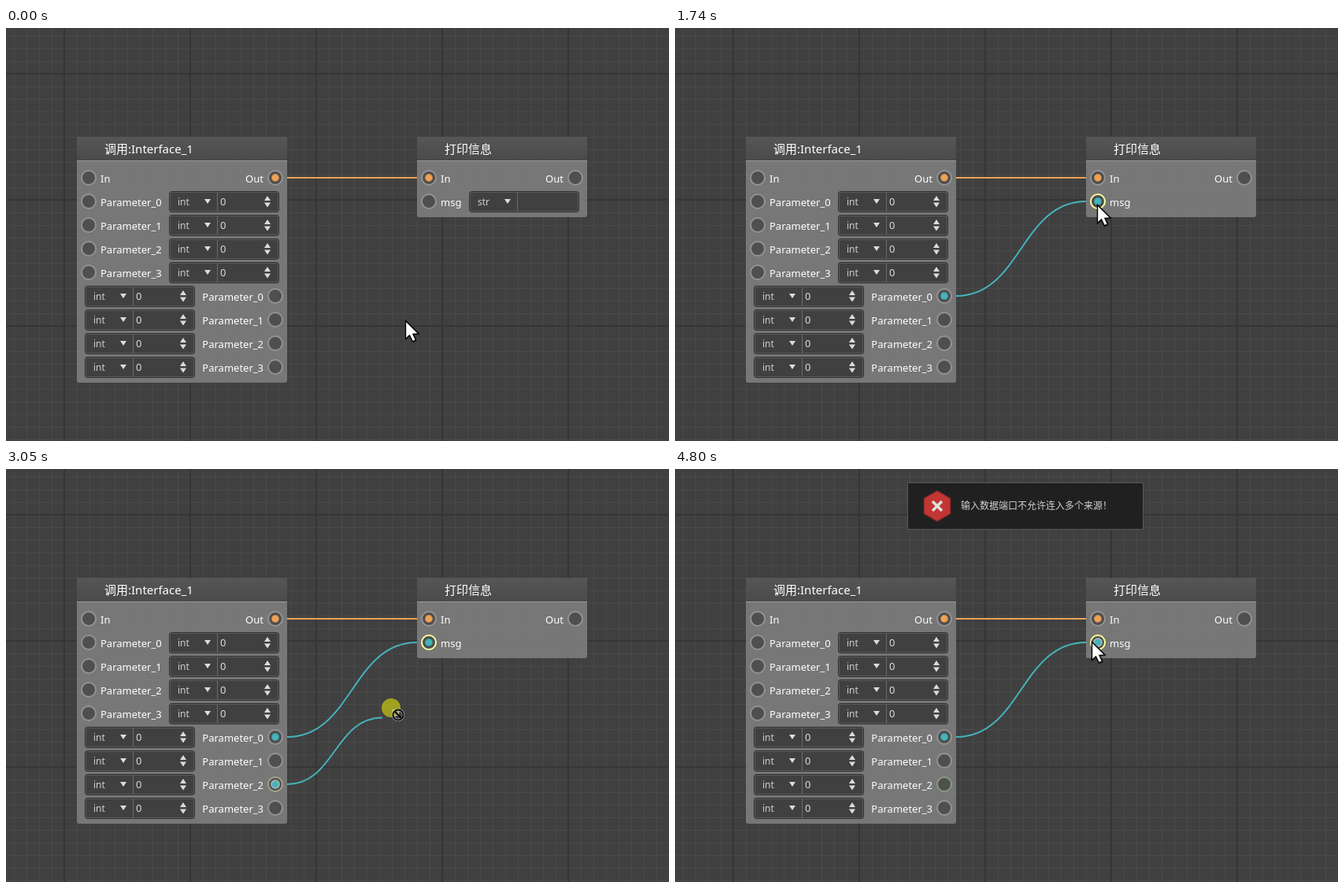
Animation of 842 by 524 pixels, one loop 5530 ms. Source, as an HTML page with a canvas:

```html
<!DOCTYPE html>
<html lang="zh-CN">
<head>
<meta charset="utf-8">
<style>
html, body { margin: 0; width: 100%; height: 100%; overflow: hidden; background: #404040; }
canvas { display: block; }
</style>
</head>
<body>
<canvas id="stage" width="842" height="524"></canvas>
<script>
const ctx = document.getElementById('stage').getContext('2d');
const W = 842, H = 524, LOOP = 5530, STEP = 70;
const FONT = '"Noto Sans", "Noto Sans CJK SC", "Noto Sans CJK", sans-serif';
const ORANGE = '#eda254', TEAL = '#45b3bb', RING = '#939393', HOT = '#ffff9c';

// Moments at which the scene changes hard
const PRESS_1 = 690, DROP_1 = 1600, PRESS_2 = 2640, DRAG_2 = 2710, DROP_2 = 3470;
const REJECT = 3540, CLEAR = 4100, TOAST = 3860;

// Pointer path: time, x, y
const PATH = [
  [0, 507, 371], [70, 498, 370], [280, 402, 360], [490, 342, 347], [560, 338, 346],
  [690, 336, 346], [840, 386, 318], [1050, 478, 261], [1120, 494, 253],
  [1330, 524, 232], [1540, 536, 224], [1870, 536, 224], [1940, 518, 246],
  [2080, 437, 337], [2220, 374, 399], [2360, 360, 402], [2500, 338, 402],
  [2640, 340, 402], [2710, 351, 399], [2850, 410, 368], [2980, 467, 328],
  [3050, 489, 303], [3260, 521, 240], [3470, 528, 220], [3540, 529, 219]
];

function pointer(t) {
  const i = PATH.findIndex(k => k[0] > t);
  if (i < 0) return PATH[PATH.length - 1].slice(1);
  const a = PATH[i - 1] || PATH[0], b = PATH[i];
  const p = Math.max(0, (t - a[0]) / (b[0] - a[0] || 1));
  return [a[1] + (b[1] - a[1]) * p, a[2] + (b[2] - a[2]) * p];
}

function quantise(t) {
  const start = [3050, 1870, 1740, 0].find(s => s <= t);
  return start + Math.floor((t - start) / STEP) * STEP;
}

function text(s, x, y, size, color, align = 'left') {
  ctx.font = `${size}px ${FONT}`;
  ctx.textAlign = align;
  ctx.fillStyle = color;
  ctx.fillText(s, x, y);
}

function box(x, y, w, h, r, fill, stroke) {
  ctx.beginPath();
  ctx.roundRect(x, y, w, h, r);
  if (fill) { ctx.fillStyle = fill; ctx.fill(); }
  if (stroke) { ctx.strokeStyle = stroke; ctx.lineWidth = 1; ctx.stroke(); }
}

function disc(x, y, r, fill, stroke, width = 1) {
  ctx.beginPath();
  ctx.arc(x, y, r, 0, Math.PI * 2);
  if (fill) { ctx.fillStyle = fill; ctx.fill(); }
  if (stroke) { ctx.strokeStyle = stroke; ctx.lineWidth = width; ctx.stroke(); }
}

function polygon(points, fill) {
  ctx.beginPath();
  points.forEach(([x, y]) => ctx.lineTo(x, y));
  ctx.closePath();
  ctx.fillStyle = fill;
  ctx.fill();
}

function triangle(x, y, w, h) {
  polygon([[x - w / 2, y - h / 2], [x + w / 2, y - h / 2], [x, y + h / 2]], '#dcdcdc');
}

function grid() {
  ctx.fillStyle = '#404040';
  ctx.fillRect(0, 0, W, H);
  ctx.fillStyle = '#494949';
  for (let x = 10; x < W; x += 16) ctx.fillRect(x, 0, 1, H);
  for (let y = 10; y < H; y += 16) ctx.fillRect(0, y, W, 1);
  ctx.fillStyle = '#353535';
  for (let x = 73; x < W; x += 160) ctx.fillRect(x, 0, 2, H);
  for (let y = 57; y < H; y += 160) ctx.fillRect(0, y, W, 2);
}

function panel(x, y, w, h, title) {
  box(x, y, w, h, 3, 'rgba(128,128,128,.87)');
  const head = ctx.createLinearGradient(0, y, 0, y + 30);
  head.addColorStop(0, '#565656');
  head.addColorStop(1, '#4a4a4a');
  box(x, y, w, 30, [3, 3, 0, 0], head);
  ctx.fillStyle = '#9a9a9a';
  ctx.fillRect(x, y + 30, w, 1);
  text(title, x + 35, y + 21, 15, '#fff');
}

function port(x, y, { dot, ring = RING, fill = '#4f4f4f', lit } = {}) {
  disc(x, y, 9, fill, ring, 2);
  if (!dot) return;
  disc(x, y, 5, dot, lit ? '#b4b8b4' : 'rgba(70,70,70,.35)', 1.5);
}

function field(x, y, type, spin = true) {
  box(x + .5, y - 12.5, 139, 26, 3, '#404040', '#303030');
  box(x + 1.5, y - 11.5, 137, 24, 2, null, '#5c5c5c');
  ctx.fillStyle = '#6c6c6c';
  ctx.fillRect(x + 61, y - 11, 1, 23);
  text(type, x + 11, y + 5, 12, '#cfcfcf');
  triangle(x + 49, y, 8, 6);
  if (!spin) return;
  text('0', x + 65, y + 5, 13, '#dcdcdc');
  triangle(x + 125, y - 4, 8, -6);
  triangle(x + 125, y + 4.5, 8, 6);
}

function label(s, x, y, align) { text(s, x, y + 5.5, 13, '#fff', align); }

function wire(x1, y1, x2, y2, color) {
  const mid = (x1 + x2) / 2;
  ctx.beginPath();
  ctx.moveTo(x1, y1);
  ctx.bezierCurveTo(mid, y1, mid, y2, x2, y2);
  ctx.strokeStyle = color;
  ctx.lineWidth = 2;
  ctx.stroke();
}

function nodes(t) {
  panel(90, 138, 267, 312, '调用:Interface_1');
  port(105, 190);
  label('In', 120, 190);
  port(342, 190, { dot: ORANGE });
  label('Out', 327, 190, 'right');

  const dragging2 = t >= PRESS_2 && t < CLEAR;
  const outputs = [
    t >= PRESS_1 ? { dot: TEAL } : {},
    {},
    dragging2 ? { dot: TEAL, ring: '#a3a38c', lit: true }
      : t >= CLEAR ? { ring: '#8b9886', fill: '#4e5249' } : {},
    {}
  ];
  outputs.forEach((style, i) => {
    const yIn = 220 + i * 30, yOut = 340 + i * 30;
    port(105, yIn);
    label('Parameter_' + i, 120, yIn);
    field(207, yIn, 'int');
    field(100, yOut, 'int');
    label('Parameter_' + i, 327, yOut, 'right');
    port(342, yOut, style);
  });

  panel(522, 138, 216, 102, '打印信息');
  port(537, 190, { dot: ORANGE });
  label('In', 552, 190);
  label('Out', 708, 190, 'right');
  port(723, 190);
  const linked = t >= DROP_1;
  port(537, 220, linked ? { dot: TEAL, ring: HOT, lit: t >= DROP_2 } : {});
  label('msg', 552, 220);
  if (!linked) field(588, 220, 'str', false);
}

function wires(t) {
  const end = pointer(t - STEP / 2);
  wire(357, 190, 522, 190, ORANGE);
  if (t >= DROP_1) wire(357, 340, 522, 220, TEAL);
  else if (t >= PRESS_1 + 60) wire(357, 340, ...end, TEAL);
  if (t >= DRAG_2 && t < REJECT) wire(357, 400, ...end, TEAL);
  if (t >= REJECT && t < CLEAR) {
    const fade = ctx.createLinearGradient(357, 0, 529, 0);
    fade.addColorStop(.91, '#e60808');
    fade.addColorStop(.95, '#100000');
    wire(357, 400, 529, 219, fade);
  }
}

function toast(t) {
  if (t < TOAST) return;
  const slide = Math.min(1, (t - TOAST) / 270);
  const p = Math.min(1, (t - TOAST) / 800);
  ctx.save();
  ctx.translate(0, Math.round(-77 * (1 - slide)));
  ctx.globalAlpha = 1 - (1 - p) ** 2;
  box(295.5, 17.5, 299, 59, 0, '#202020', '#595959');
  const hexagon = r => Array.from({ length: 6 }, (_, i) => {
    const a = Math.PI * (i / 3 - .5);
    return [333 + r * Math.cos(a), 47 + r * Math.sin(a)];
  });
  polygon(hexagon(20), '#8f2826');
  polygon(hexagon(18.5), '#c23633');
  ctx.beginPath();
  for (const d of [-1, 1]) {
    ctx.moveTo(333 - 6 * d, 41);
    ctx.lineTo(333 + 6 * d, 53);
  }
  ctx.strokeStyle = '#dde3da';
  ctx.lineWidth = 3.5;
  ctx.stroke();
  text('输入数据端口不允许连入多个来源！', 363, 51, 12, '#d2d2d2');
  ctx.restore();
}

function arrow(x, y) {
  ctx.save();
  ctx.translate(x, y);
  ctx.beginPath();
  [[.5, .5], [.5, 23.5], [5.5, 19], [9.5, 27], [13.5, 25], [10, 17.5], [17, 17]]
    .forEach(([px, py]) => ctx.lineTo(px, py));
  ctx.closePath();
  ctx.shadowColor = 'rgba(0,0,0,.4)';
  ctx.shadowBlur = 2;
  ctx.shadowOffsetX = ctx.shadowOffsetY = 1;
  ctx.fillStyle = '#fff';
  ctx.fill();
  ctx.shadowColor = 'transparent';
  ctx.strokeStyle = '#000';
  ctx.lineWidth = 1.4;
  ctx.stroke();
  ctx.restore();
}

function forbidden(x, y) {
  disc(x, y, 12, 'rgba(255,255,0,.5)');
  const cx = x + 9, cy = y + 9;
  box(cx - 6.5, cy - 6.5, 7, 7, 0, null, 'rgba(255,255,255,.6)');
  disc(cx, cy, 6.5, null, '#c8c8c8', 3);
  disc(cx, cy, 6.5, null, '#080808', 2);
  ctx.beginPath();
  ctx.moveTo(cx - 4.5, cy - 4.5);
  ctx.lineTo(cx + 4.5, cy + 4.5);
  ctx.strokeStyle = '#080808';
  ctx.lineWidth = 2;
  ctx.stroke();
}

function draw(t) {
  grid();
  nodes(t);
  wires(t);
  toast(t);
  const [x, y] = pointer(t);
  const dragging = (t >= PRESS_1 && t < DROP_1) || (t >= DRAG_2 && t < DROP_2 && y > 228);
  (dragging ? forbidden : arrow)(x, y);
}

let origin;
function frame(now) {
  origin ??= now;
  draw(quantise((now - origin) % LOOP));
  requestAnimationFrame(frame);
}
draw(0);
requestAnimationFrame(frame);
</script>
</body>
</html>
```
